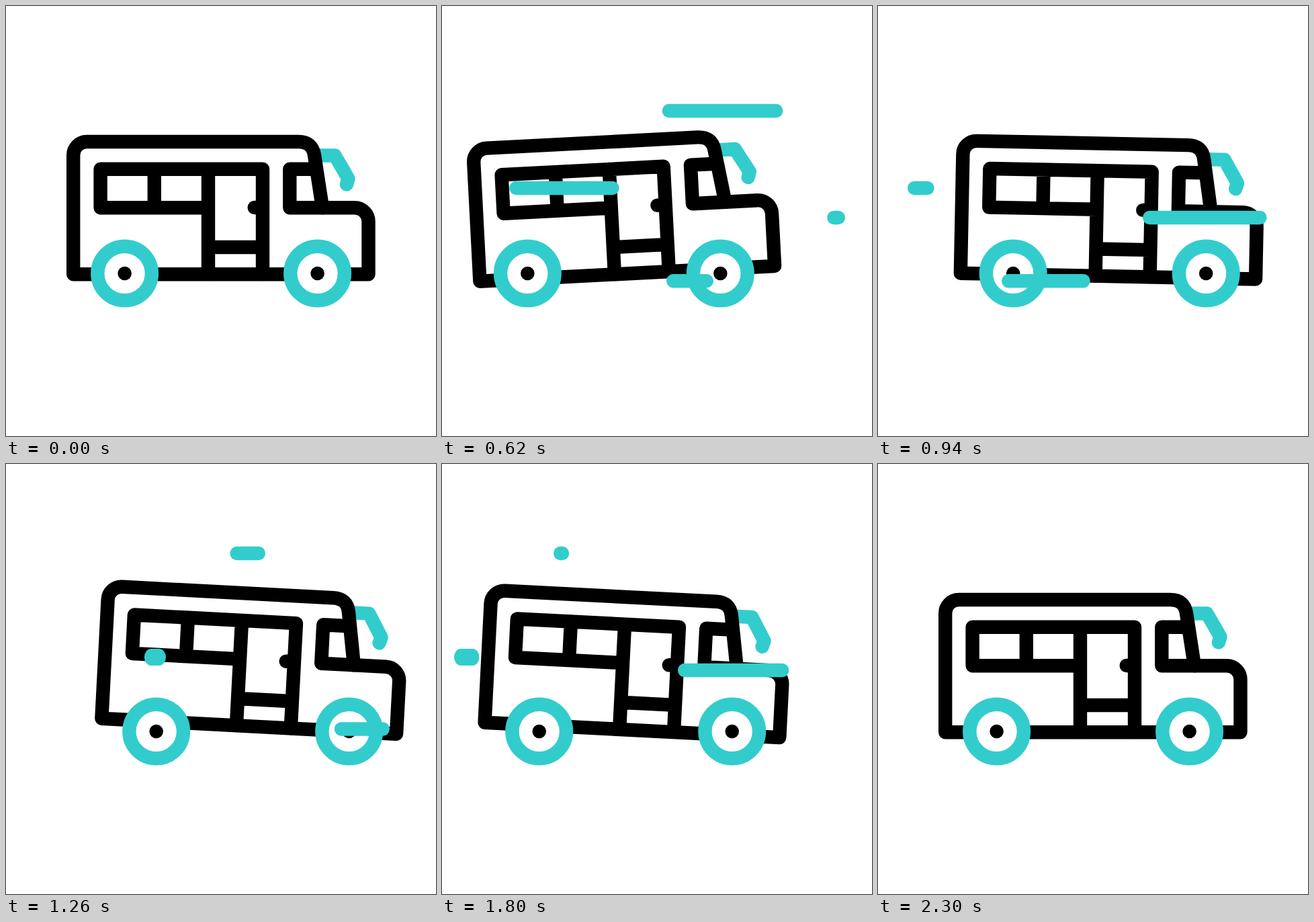
An HTML page for the animation above (3600 ms loop, 640 by 640 pixels).

```html
<!DOCTYPE html>
<html lang="en">
<head>
<meta charset="utf-8">
<title>Bus</title>
<style>
  html, body { margin: 0; width: 100%; height: 100%; overflow: hidden; background: #fff; }
  svg { display: block; width: 100%; height: 100%; }
  .ink { fill: none; stroke: #000; stroke-width: 20.4; stroke-linejoin: round; stroke-linecap: round; }
  .teal { stroke: #3cc; }
  .ring { fill: #fff; stroke: #3cc; stroke-width: 20.4; }
</style>
</head>
<body>
<svg viewBox="0 0 640 640">
  <g id="body">
    <path class="ink teal" d="M462 222.5H489.5L509.5 257L507 265.5"/>
    <g class="ink">
      <path d="M100.2 399.3V222a20 20 0 0 1 20-20H435Q456 202 459 222L471 300.3H519a20.5 20.5 0 0 1 20.5 20.5V399.3Z"/>
      <path d="M301 300.3H140.6V242.7H382V399M301 242.7V399M220.8 242.7V300M301 359H382M369.7 300H382"/>
      <path d="M460 242.7H422.3V300.3H471"/>
    </g>
  </g>
  <g id="wheels">
    <g id="wheel">
      <circle class="ring" cx="176.6" cy="398" r="40.3"/>
      <circle cx="176.6" cy="398" r="10.3"/>
    </g>
    <use href="#wheel" x="287"/>
  </g>
  <g id="wind" fill="#3cc"></g>
</svg>
<script>
const LOOP = 3600, DRIVE = 2300, STEP = 20, LENGTH = 200;
const $ = id => document.getElementById(id);

// cubic-bezier(.42, 0, .58, 1)
function ease(x) {
  if (x <= 0) return 0;
  if (x >= 1) return 1;
  let lo = 0, hi = 1, s;
  for (let i = 0; i < 20; i++) {
    s = (lo + hi) / 2;
    const bx = 1.26 * (1 - s) ** 2 * s + 1.74 * (1 - s) * s * s + s ** 3;
    if (bx < x) lo = s; else hi = s;
  }
  return s * s * (3 - 2 * s);
}

// Eases through evenly spaced poses between start and the end of the drive
function sway(poses, t, start = 0) {
  const last = poses.length - 1;
  const pos = Math.min(Math.max((t - start) / (DRIVE - start), 0), 1) * last;
  const i = Math.min(Math.floor(pos), last - 1);
  return poses[i] + (poses[i + 1] - poses[i]) * ease(pos - i);
}

// A line that grows leftwards, then is caught up by its tail
function streak(start, right, y, h = 20.4) {
  const el = document.createElementNS('http://www.w3.org/2000/svg', 'rect');
  const set = attrs => Object.entries(attrs).forEach(([k, v]) => el.setAttribute(k, v));
  set({ y: y - h / 2, height: h, rx: 10, ry: h / 2 });
  $('wind').append(el);
  return t => {
    const age = t - start;
    const head = LENGTH * ease(age / 468), tail = LENGTH * ease((age - 284) / 425);
    set({
      x: right - head - 10,
      width: head - tail + 20,
      visibility: age > 0 && age < 690 ? 'visible' : 'hidden'
    });
  };
}

const wind = [
  streak(217, 530, 156), streak(324, 254, 271), streak(458, 394, 409.3), streak(559, 590, 315),
  streak(1079, 561, 394.5), streak(1129, 376, 133), streak(1179, 228, 287.5, 25), streak(1365, 559, 307)
];

function draw(t) {
  const x = sway([0, -50.5, 53.5, -33, 0], t);
  const y = sway([0, -8.2, -0.6, 3, -9.6, -6, 0, 0], t);
  const tilt = sway([0, -3, 3, 3, 0], t, 20);
  $('body').setAttribute('transform', `translate(${x} ${y}) rotate(${tilt} 320 300)`);
  $('wheels').setAttribute('transform', `translate(${x} 0)`);
  wind.forEach(blow => blow(t));
}

const begin = performance.now();
function tick() {
  const t = (performance.now() - begin) % LOOP;
  draw(t - t % STEP);
  requestAnimationFrame(tick);
}
tick();
</script>
</body>
</html>
```
